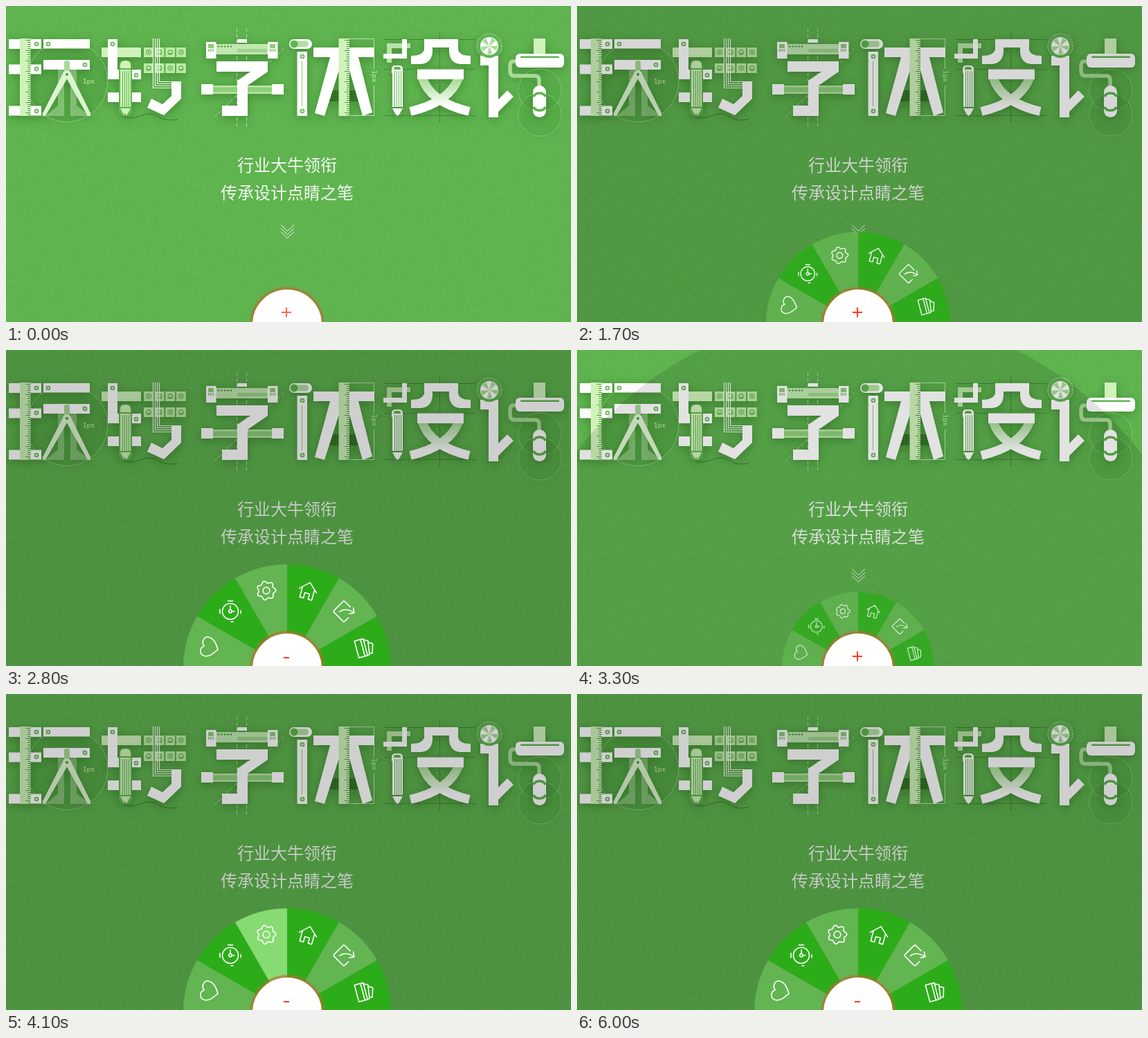
Recreate the animation shown at these times as an HTML page with a canvas. Size 816x457 px, loop 6700 ms.

```html
<!DOCTYPE html>
<html lang="zh">
<head>
<meta charset="utf-8">
<style>
html, body { margin: 0; width: 100%; height: 100%; overflow: hidden; background: #5fb54f; }
canvas { display: block; }
</style>
</head>
<body>
<canvas id="stage" width="816" height="457"></canvas>
<script>
const W = 816, H = 457, LOOP = 6700, TAU = Math.PI * 2;
const GREEN = '#5fb54f', PALE = '#cff3ba', DEEP = '#4d9a3f', WHITE = '#fff';
const CX = 406, CY = 460;
const stage = document.getElementById('stage').getContext('2d');

function layer(w, h) {
  const el = document.createElement('canvas');
  el.width = w; el.height = h;
  return el.getContext('2d');
}

const art = layer(W, H);

function box(x, y, w, h, color = WHITE, r = 0) {
  art.fillStyle = color;
  art.beginPath();
  art.roundRect(x, y, w, h, r);
  art.fill();
}
function fill(d, color = WHITE) {
  art.fillStyle = color;
  art.fill(new Path2D(d));
}
function line(d, color = WHITE, width = 1, dash = []) {
  art.strokeStyle = color;
  art.lineWidth = width;
  art.setLineDash(dash);
  art.stroke(new Path2D(d));
  art.setLineDash([]);
}
function disc(x, y, r, color) {
  art.fillStyle = color;
  art.beginPath();
  art.arc(x, y, r, 0, TAU);
  art.fill();
}
function ring(x, y, r, color = WHITE, width = 1, dash = []) {
  art.strokeStyle = color;
  art.lineWidth = width;
  art.setLineDash(dash);
  art.beginPath();
  art.arc(x, y, r, 0, TAU);
  art.stroke();
  art.setLineDash([]);
}
function screw(x, y) {
  disc(x, y, 3.3, GREEN);
  line(`M${x - 2} ${y}h4M${x} ${y - 2}v4`, WHITE, 1);
}
function ruler(x) {
  box(x, 47, 15.5, 112, PALE);
  for (let i = 0; i < 37; i++) {
    const len = i % 5 ? 4 : 7;
    box(x + 15.5 - len, 49 + i * 3, len, 1, DEEP);
  }
}
function label(text, x, y, turn = 0) {
  art.save();
  art.translate(x, y);
  art.rotate(turn);
  art.fillStyle = PALE;
  art.font = '9px "DejaVu Sans", sans-serif';
  art.fillText(text, 0, 0);
  art.restore();
}
function pencil(x, color) {
  box(x, 92, 15, 54, color);
  for (let i = 3; i < 15; i += 3) box(x + i, 94, 1, 52, GREEN);
  fill(`M${x} 148h15l-5 9l-2.5 2l-2.5 -2z`, color);
}

function drawPlay() {
  disc(88, 109, 58, 'rgba(40,110,30,.1)');
  ring(88, 109, 58.5, '#e4f6dc', 1, [1, 1.6]);
  fill('M75 92h9v54h-9zM93 92h9v54h-9zM57 159l18-15h9v15zM93 159v-15h9l20 15z', 'rgba(205,240,189,.4)');
  for (const y of [48, 84.5, 144.5]) box(4, y, 47, 14);
  ruler(20);
  for (const y of [55, 91, 152]) screw(44, y);
  box(54, 48, 67, 13.5);
  box(54, 78, 67, 14);
  screw(61, 55);
  screw(114, 85);
  box(84, 79, 8, 17, '#a6d996', 3);
  fill('M83 96L90 102L57 159H53V155zM93 96L86 102L118 159H122V155z', '#dcf5d0');
  disc(88, 99, 6, '#dcf5d0');
  disc(88, 99, 2, DEEP);
  label('1px', 111, 112);
}

function drawTurn() {
  box(138, 60, 57, 14, PALE);
  box(147, 48, 14, 58);
  box(147, 92, 48, 14);
  box(147, 125, 48, 14);
  screw(154, 55);
  screw(188, 100);
  box(163, 79, 19, 80, GREEN, 7);
  box(165, 79, 15, 11, PALE, [6, 6, 0, 0]);
  pencil(165, PALE);
  line('M172 155v6C186 165 198 155 210 156S222 168 248 164', '#3a7a2c', 1);
  for (let i = 0; i < 8; i++) {
    const x = 199 + (i % 4) * 15.6, y = i < 4 ? 60 : 83;
    box(x, y, 14, 14, '#bce9a6');
    ring(x + 7, y + 7, 3.2, GREEN, 1.2);
    if (i % 3 === 0) disc(x + 7, y + 7, 1.2, GREEN);
    else box(x + 4, y + 8, 6, 2, GREEN);
  }
  for (let i = 0; i < 4; i++) {
    line(`M${212.5 + i * 3} 47V${118.5 - i * 3}H253`, '#eefbe8', 1.2);
  }
  fill('M239 109H253V134L228 158L204 147L210 134L226 142L239 130z');
}

function drawWord() {
  line('M301 161L402 60M333.5 33V175M347.5 33V175', 'rgba(225,245,215,.65)', 1, [5, 3]);
  box(334, 48, 14, 5);
  box(303, 55, 75, 15, '#c0e8af');
  box(334, 62, 43, 5, '#9fd48e', 2);
  for (let i = 0; i < 5; i++) disc(307 + i * 4.5, 58.5, 1.3, DEEP);
  for (const x of [289, 378]) {
    box(x, 52, 14.5, 24);
    box(x + 3, 55, 8, 6, '#8fca7e');
    for (let i = 0; i < 4; i++) box(x + 3 + i * 2.3, 62, 1, 4, GREEN);
  }
  box(299, 115, 85, 12, '#b9e6a5');
  box(299, 117.5, 85, 7, '#8fcf7b');
  box(282, 113, 17, 15);
  box(384, 113, 17, 15);
  fill('M304 80H378V95L349 115V159H312V144H334V108L353 95H304z');
}

function drawBody() {
  box(409, 48, 33, 14, WHITE, 7);
  box(411, 50.5, 26, 9, '#b4dfa2', 4.5);
  disc(416, 55, 5.5, GREEN);
  box(420.5, 66, 14.5, 93);
  screw(428, 73);
  screw(428, 152);
  line('M427.5 80V145', '#8acb78', 1);
  box(467, 122, 43, 15, '#2f6d21');
  for (let i = 0; i < 10; i++) box(469 + i * 4, 122, 1, 15, '#3a7a2b');
  for (let i = 0; i < 4; i++) box(467, 125 + i * 4, 43, 1, '#3a7a2b');
  line('M496.5 47.5H531.5V91M531.5 115V158.5H496.5', '#b9e3a9', 1);
  box(444, 60, 88, 14);
  fill('M468 74H481V93L460 159L446 155zM496 74H509L529 154L515 159L496 93z');
  ruler(480.5);
  label('1px', 529, 93, Math.PI / 2);
}

function drawSet() {
  line('M546 48.5H678M546 91.5H678M546 158.5H678M626.5 39V169', '#418536', 1);
  line('M584 57.5H553.5V82', '#b8e3a8', 7);
  line('M545 72.5H575.5V48', WHITE, 7);
  box(557, 86, 16, 11, WHITE, [5, 5, 0, 0]);
  box(560, 88, 10, 6, GREEN, 3);
  pencil(558, WHITE);
  fill('M604 48H653V63Q655 72 671 72V84H655Q641 82 640 66V60H616V66Q615 82 600 84H585V72Q601 72 604 63z');
  const fade = art.createLinearGradient(0, 106, 0, 145);
  fade.addColorStop(0, '#a9db98');
  fade.addColorStop(1, WHITE);
  line('M654 103Q641 139 584 152.500', fade, 13);
  line('M601 103Q612 139 669 152.500', fade, 13);
  box(594, 91.5, 67, 14.5);
}

function drawPlan() {
  fill('M685 72H711V135L724 122L733 131L711 153V161H697V86H685z');
  disc(698, 58, 17, GREEN);
  ring(698, 58, 18, WHITE, 1, [1.5, 1.5]);
  disc(698, 58, 13, WHITE);
  for (let i = 0; i < 5; i++) {
    const a = i * TAU / 5 - 1.3;
    art.fillStyle = '#a9db98';
    art.beginPath();
    art.moveTo(698, 58);
    art.arc(698, 58, 12, a, a + 0.6);
    art.fill();
  }
  for (const y of [122, 157]) {
    disc(771, y, 31, 'rgba(40,110,30,.07)');
    ring(771, y, 31, '#a9db98', 1, [1.5, 1.5]);
  }
  box(762, 47, 17, 24, PALE);
  line('M740 80H733Q728 80 728 86V94Q728 101 734 101H764Q770 101 770 107V117', '#a9db98', 5.5);
  box(736, 69, 70, 20, WHITE, 6);
  box(743, 72.5, 56, 2.5, GREEN, 1);
  box(761, 115, 19, 46, WHITE, 9.5);
  line('M761.500 131A10.500 10.500 0 0 1 779.500 131M761.500 146A10.500 10.500 0 0 0 779.500 146', GREEN, 3.5);
}

function paintScene() {
  const out = layer(W, H), tile = layer(128, 128);
  let seed = 7;
  const rnd = () => (seed = (seed * 16807) % 2147483647) / 2147483647;
  for (let i = 0; i < 128 * 128; i++) {
    const v = rnd() - 0.5;
    tile.fillStyle = `rgba(${v > 0 ? '255,255,255' : '0,40,0'},${Math.abs(v) * 0.07})`;
    tile.fillRect(i % 128, i >> 7, 1, 1);
  }
  out.fillStyle = GREEN;
  out.fillRect(0, 0, W, H);
  out.fillStyle = out.createPattern(tile.canvas, 'repeat');
  out.fillRect(0, 0, W, H);

  [drawPlay, drawTurn, drawWord, drawBody, drawSet, drawPlan].forEach(draw => draw());
  out.save();
  out.shadowColor = 'rgba(30,90,20,.45)';
  out.shadowBlur = 14;
  out.shadowOffsetY = 3;
  out.drawImage(art.canvas, 0, 0);
  out.restore();

  out.fillStyle = 'rgba(255,255,255,.93)';
  out.font = '300 24px "Noto Sans CJK SC Light", "Noto Sans CJK SC", "Noto Sans CJK", sans-serif';
  out.textAlign = 'center';
  out.fillText('行业大牛领衔', 406, 238.5);
  out.fillText('传承设计点睛之笔', 406, 279);
  out.strokeStyle = 'rgba(255,255,255,.9)';
  out.lineWidth = 1;
  for (const y of [316.5, 321.5, 326.5]) {
    out.stroke(new Path2D(`M397 ${y}L406.5 ${y + 9}L416 ${y}`));
  }
  return out.canvas;
}

function gearPath() {
  let d = '';
  for (let i = 0; i <= 84; i++) {
    const a = i * TAU / 84, r = 12.3 + 1.5 * Math.cos(7 * a);
    d += (i ? 'L' : 'M') + r * Math.sin(a) + ' ' + -r * Math.cos(a);
  }
  return d + 'zM4.8 0A4.8 4.8 0 1 1 -4.8 0A4.8 4.8 0 1 1 4.8 0';
}

// heart, timer, gear, house, share, cards
const icons = [
  'M0 12.500C-7 8 -14 3 -14 -4C-14 -12 -4 -14 0 -8C4 -14 14 -12 14 -4C14 3 7 8 0 12.500z',
  'M11.500 0A11.500 11.500 0 1 1 -11.500 0A11.500 11.500 0 1 1 11.500 0M2.200 0A2.200 2.200 0 1 1 -2.200 0A2.200 2.200 0 1 1 2.200 0M0 -2V-8M2 0H6M-3.500 -15H3.500M-15 -3V3M15 -1V3M1 15H4',
  gearPath(),
  'M-13 0L0 -12L13 0M-9 -3V12H-3.500V4H3.500V12H9V-3',
  'M2 -11H-9Q-11 -11 -11 -9V9Q-11 11 -9 11H9Q11 11 11 9V2M-4 5Q-3 -6 12 -9M6 -13L12 -9L8 -3',
  'M-12.500 -1H12.500V12H-12.500zM-12.500 3H12.500M-11 -1L-8 -7L12 -4V-1M-6 -6.500L-2 -12.500L11 -8.500L10 -4.500'
].map(d => new Path2D(d));

const light = ['#62b550', '#86db72'], dark = ['#2dac1a', '#4bd432'];

// Open amount in steps of 100 ms from each start; minus marks an opening
const moves = [
  { at: 0, sign: '+', steps: [0] },
  { at: 800, sign: '-', steps: [0.06, 0.36, 0.7, 0.88, 0.97, 1] },
  { at: 1700, sign: '+', steps: [0.83, 0.45, 0.12, 0] },
  { at: 2500, sign: '-', steps: [0.15, 0.55, 0.88, 1] },
  { at: 3300, sign: '+', steps: [0.6, 0.15, 0] },
  { at: 3700, sign: '-', steps: [0.06, 0.36, 0.75, 0.95, 1] }
];
const hovers = [[0, -1], [4100, 2], [4400, 1], [4600, 0], [4800, 1], [4900, 2], [5100, 3], [5400, 4], [5600, 5], [5800, -1]];
const clamp = v => Math.max(0, Math.min(1, v));

function drawWheel(p, hot) {
  const s = (1 + 2 * p) / 3;
  stage.save();
  stage.translate(CX, CY);
  stage.scale(s, s);
  stage.globalAlpha = p * 0.19;
  stage.fillStyle = '#000';
  stage.beginPath();
  stage.arc(0, 0, 700, 0, TAU);
  stage.fill();
  stage.globalAlpha = Math.sqrt(p);
  icons.forEach((icon, i) => {
    const a = Math.PI + i * Math.PI / 6;
    stage.fillStyle = (i % 2 ? dark : light)[i === hot ? 1 : 0];
    stage.beginPath();
    stage.moveTo(0, 0);
    stage.arc(0, 0, 150, a, a + Math.PI / 6);
    stage.fill();
    stage.save();
    const turn = (i * 30 - 75) * Math.PI / 180;
    stage.rotate(turn);
    stage.translate(0, -116);
    if (i === 1) stage.rotate(-turn);
    stage.strokeStyle = WHITE;
    stage.lineWidth = 1.6;
    stage.lineJoin = stage.lineCap = 'round';
    stage.stroke(icon);
    stage.restore();
  });
  stage.restore();
}

function drawButton(sign, color) {
  const glow = stage.createRadialGradient(CX, CY, 50, CX, CY, 55);
  glow.addColorStop(0, 'rgba(180,110,40,.75)');
  glow.addColorStop(0.6, 'rgba(180,110,50,.55)');
  glow.addColorStop(1, 'rgba(180,110,50,0)');
  stage.fillStyle = glow;
  stage.beginPath();
  stage.arc(CX, CY, 55, 0, TAU);
  stage.fill();
  stage.fillStyle = WHITE;
  stage.beginPath();
  stage.arc(CX, CY, 50, 0, TAU);
  stage.fill();
  stage.fillStyle = color;
  if (sign === '+') {
    stage.fillRect(398, 442, 14, 2);
    stage.fillRect(404, 436, 2, 14);
  } else {
    stage.fillRect(401, 444, 8, 2);
  }
}

function drawPanel(alpha) {
  if (!alpha) return;
  stage.globalAlpha = alpha;
  stage.fillStyle = '#f6f6f4';
  stage.beginPath();
  stage.roundRect(-4, 439, 188, 24, 3);
  stage.fill();
  stage.globalAlpha = 1;
}

const scene = paintScene();

function frame(now) {
  const t = Math.floor((now % LOOP) / 100) * 100;
  const move = moves.filter(m => m.at <= t).pop();
  const step = Math.min((t - move.at) / 100, move.steps.length - 1);
  const p = move.steps[step];
  const hot = hovers.filter(h => h[0] <= t).pop()[1];
  stage.drawImage(scene, 0, 0);
  if (p > 0) drawWheel(p, hot);
  drawButton(move.sign, t < 500 ? '#fa6a45' : '#f5401f');
  drawPanel(clamp((t - 4300) / 300) * clamp((6000 - t) / 300));
  requestAnimationFrame(frame);
}
requestAnimationFrame(frame);
</script>
</body>
</html>
```
